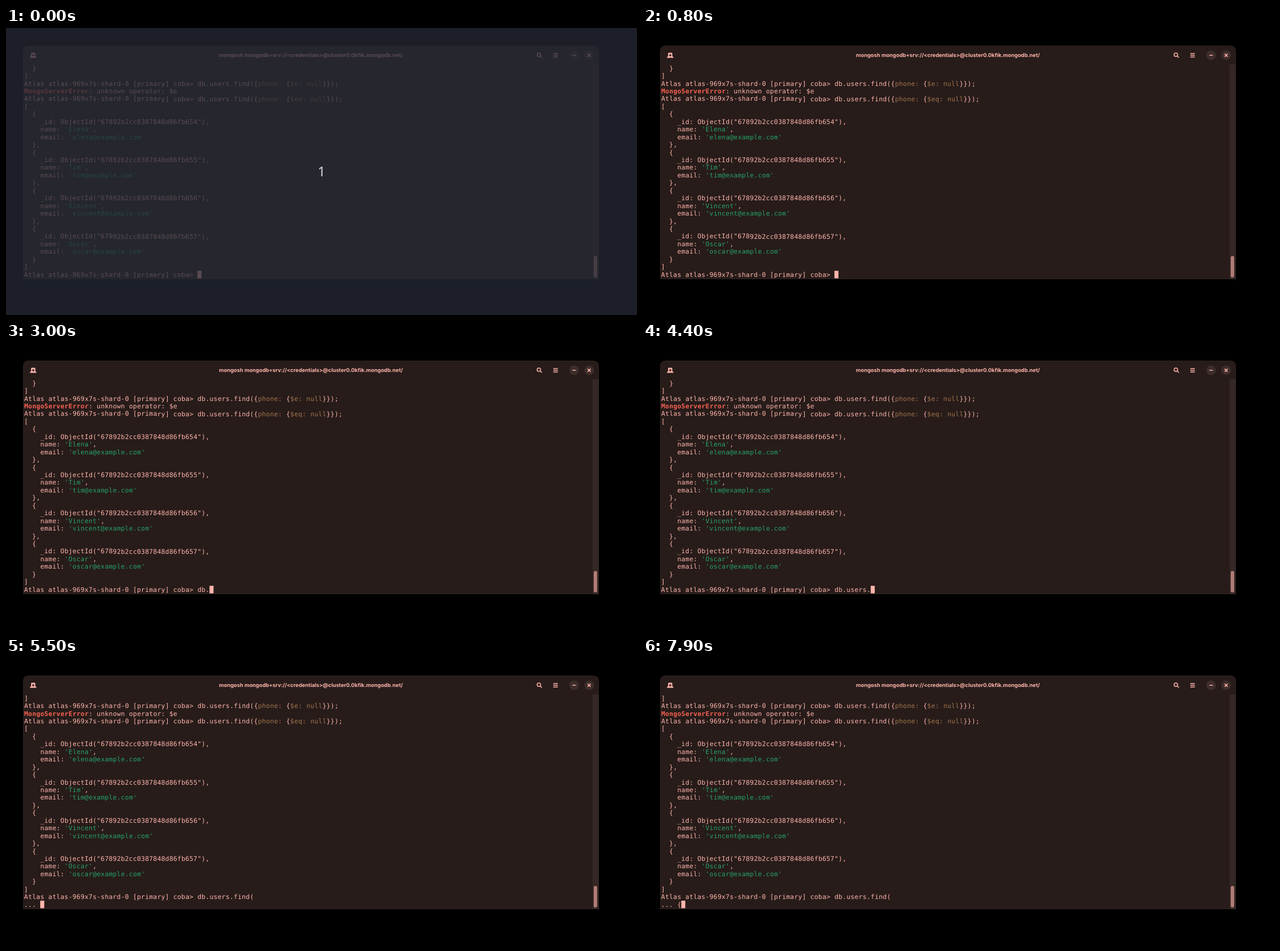
Write an HTML page that moves like this. It is 1108 by 505 pixels and loops after 8000 ms.

```html
<!DOCTYPE html>
<html lang="en">
<head>
<meta charset="utf-8">
<title>Terminal</title>
<style>
  :root { --ink: #ffb4ab; --win: #271c1a; }
  html, body { margin: 0; width: 100%; height: 100%; overflow: hidden; background: #000; }
  #stage { position: relative; width: 1108px; height: 505px; overflow: hidden; background: #000; }
  #chrome { position: absolute; inset: 0; }
  #title {
    font: 700 9.28px Inter, sans-serif; fill: var(--ink);
    text-anchor: middle; text-rendering: geometricPrecision;
  }

  /* A 10 x 19 cell grid at a reduced scale; the slight turn keeps baselines from snapping to whole pixels */
  #term {
    position: absolute; left: 31.95px; top: 64px; width: 1400px; height: 532px;
    overflow: hidden; transform: scale(.7077) rotate(.025deg); transform-origin: 0 0;
  }
  #screen {
    position: absolute; left: 0; bottom: 0; margin: 0; color: var(--ink);
    font: 16px/19px "DejaVu Sans Mono", monospace;
    letter-spacing: calc(10px - 1ch); white-space: pre;
    text-rendering: geometricPrecision; font-variant-ligatures: none;
  }
  .key { color: #a2734c; }
  .str { color: #26a269; }
  .err { color: #f66151; font-weight: 700; }
  #cursor { display: inline-block; width: 10px; height: 19px; vertical-align: top; background: var(--ink); }

  #veil {
    position: absolute; inset: 0;
    background: rgba(38, 42, 53, .76); color: #dcdcde;
    font: 23px/505px "Noto Sans", sans-serif; text-align: center;
  }
</style>
</head>
<body>
<div id="stage">
  <svg id="chrome" width="1108" height="505" viewBox="0 0 1108 505">
    <path d="M30 442V41q0-10 10-10H1031q10 0 10 10V442z" fill="var(--win)"/>
    <rect x="1030" y="64" width="11" height="378" fill="#352725"/>
    <rect x="1032" y="401" width="6" height="38" rx="3" fill="#b07c75"/>
    <path d="M30.4 441.6V41q0-9.6 9.6-9.6H1031q9.600 0 9.600 9.600V441.600z" fill="none" stroke="#fff" stroke-opacity=".06" stroke-width=".7"/>
    <g fill="#3d2d2b">
      <circle cx="997.5" cy="48" r="8.5"/>
      <circle cx="1024" cy="48" r="8.5"/>
    </g>
    <path d="M42 52.5V51q2 0 2-2V45q0-1.5 1.5-1.5H50q1.5 0 1.5 1.5V49q0 2 2 2V52.5z" fill="var(--ink)"/>
    <path d="M45.5 48H50M47.75 45.75V50.25" stroke="var(--win)" stroke-width="1.3"/>
    <g fill="none" stroke="var(--ink)" stroke-width="1.5">
      <circle cx="935.7" cy="47" r="3.1"/>
      <path d="M938 49.3L941 52.3"/>
      <path d="M961 45H969M961 48H969M961 51H969" stroke-width="1.4"/>
      <path d="M994.5 48H1000.5"/>
      <path d="M1021.4 45.4L1026.6 50.6M1026.6 45.4L1021.4 50.6"/>
    </g>
    <text id="title" x="535.5" y="51.2">mongosh mongodb+srv://&lt;credentials&gt;@cluster0.0kfik.mongodb.net/</text>
  </svg>
  <div id="term"><pre id="screen"><span id="log"></span><span id="typed"></span><span id="cursor"></span></pre></div>
  <div id="veil">1</div>
</div>
<script>
  const LOOP = 8000;
  const $ = id => document.getElementById(id);
  const span = (cls, text) => `<span class="${cls}">${text}</span>`;
  const show = (id, on) => { $(id).style.visibility = on ? 'visible' : 'hidden'; };

  const prompt = 'Atlas atlas-969x7s-shard-0 [primary] coba&gt; ';
  const query = op =>
    `${prompt}db.users.find({${span('key', 'phone:')} {${span('key', `$${op}: null`)}}});`;
  const user = (name, i) => [
    '  {',
    `    _id: ObjectId("67892b2cc0387848d86fb65${4 + i}"),`,
    `    name: ${span('str', `'${name}'`)},`,
    `    email: ${span('str', `'${name.toLowerCase()}@example.com'`)}`,
    '  }'
  ].join('\n');

  $('log').innerHTML = [
    '  }',
    ']',
    query('e'),
    span('err', 'MongoServerError') + ': unknown operator: $e',
    query('eq'),
    '[',
    ['Elena', 'Tim', 'Vincent', 'Oscar'].map(user).join(',\n'),
    ']',
    prompt
  ].join('\n');

  // Bursts of typing: text, start and time per key in ms
  const keys = [
    ['db', 2300, 200], ['.', 3000, 0], ['users', 3400, 150],
    ['.find', 4400, 100], ['(\n', 5100, 400], ['{', 6900, 0]
  ].flatMap(([text, start, gap]) =>
    [...text].map((char, i) => ({ char, at: start + i * gap })));

  // The cursor blinks from the last key press on
  function cursorOn(t, last) {
    const [from, half] = last ? [last.at, 500] : [-400, 600];
    return Math.floor((t - from) / half) % 2 === 0;
  }

  function draw(t) {
    const pressed = keys.filter(k => k.at <= t);
    const text = pressed.map(k => k.char).join('').replace('\n', '\n... ');
    if ($('typed').textContent !== text) $('typed').textContent = text;
    show('cursor', cursorOn(t, pressed.at(-1)));
    show('veil', t < 100);
  }

  const start = performance.now();
  function tick() {
    draw((performance.now() - start) % LOOP);
    requestAnimationFrame(tick);
  }
  draw(0);
  requestAnimationFrame(tick);
</script>
</body>
</html>
```
